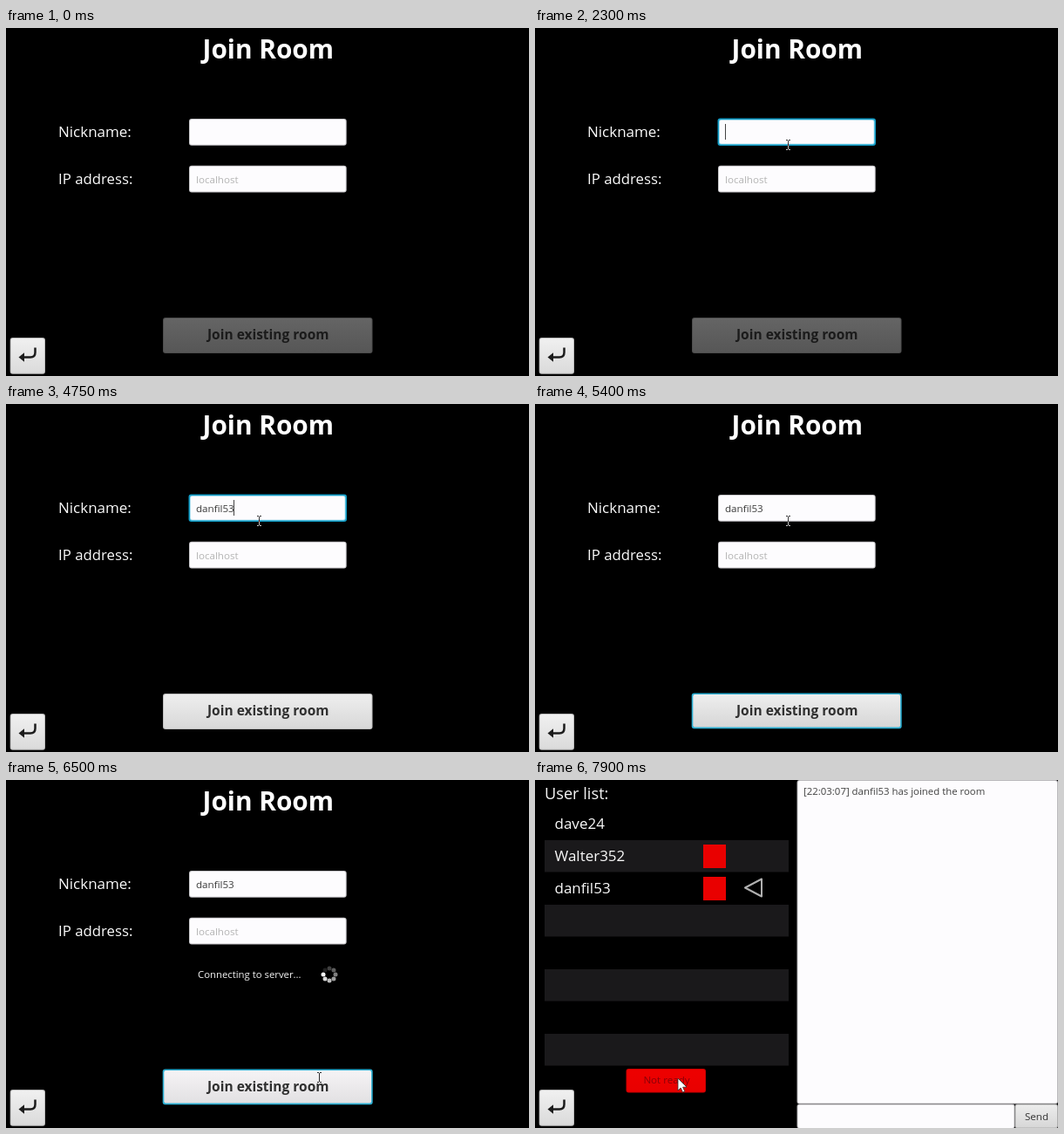
Animation, 600 px wide and 399 px high, one loop 8 s. Source, as an HTML page with a canvas:

```html
<!DOCTYPE html>
<html lang="en">
<head>
<meta charset="utf-8">
<title>Join Room</title>
<style>
  html, body { margin: 0; width: 100%; height: 100%; overflow: hidden; background: #000; }
  canvas { display: block; width: 600px; height: 399px; }
</style>
</head>
<body>
<canvas id="stage" width="600" height="399"></canvas>
<script>
const ctx = document.getElementById('stage').getContext('2d');
const LOOP = 8000, STEP = 50;
const FONT = '"Open Sans", "Noto Sans", sans-serif';
const NICK = 'danfil53';

const FOCUS_NICK = 1250, TYPE_START = 3350, TYPE_GAP = 125;
const FOCUS_IP = 4800, FOCUS_JOIN = 5350, HOVER = 6150;
const CONNECT = 6450, ROOM = 6550;

// Pointer keys: time, x, y
const TO_JOIN = [
  [5600, 290, 134], [5750, 298, 172], [5900, 318, 265],
  [6000, 331, 309], [6100, 339, 327], [6250, 352, 337], [6400, 359, 341]
];
const TO_READY = [
  [7000, 359, 341], [7150, 350, 305], [7300, 318, 258], [7450, 262, 250],
  [7600, 205, 287], [7750, 157, 340], [7850, 145, 345], [7900, 164, 342]
];

function spline(a, b, c, d, u) {
  return 0.5 * (2 * b + (c - a) * u + (2 * a - 5 * b + 4 * c - d) * u * u
    + (3 * b - a - 3 * c + d) * u * u * u);
}

function along(keys, t) {
  const last = keys.length - 1;
  if (t <= keys[0][0]) return keys[0].slice(1);
  if (t >= keys[last][0]) return keys[last].slice(1);
  let i = 0;
  while (t >= keys[i + 1][0]) i++;
  const at = k => keys[Math.max(0, Math.min(last, k))];
  const u = (t - keys[i][0]) / (keys[i + 1][0] - keys[i][0]);
  return [1, 2].map(n => spline(at(i - 1)[n], at(i)[n], at(i + 1)[n], at(i + 2)[n], u));
}

function text(str, x, y, size, color, weight = 400, align = 'left') {
  ctx.font = `${weight} ${size}px ${FONT}`;
  ctx.textAlign = align;
  ctx.fillStyle = color;
  ctx.fillText(str, x, y);
}

function rect(x, y, w, h, color) {
  ctx.fillStyle = color;
  ctx.fillRect(x, y, w, h);
}

function box(x, y, w, h, r, color) {
  ctx.beginPath();
  ctx.roundRect(x, y, w, h, r);
  ctx.fillStyle = color;
  ctx.fill();
}

function shade(y, h, top, bottom) {
  const g = ctx.createLinearGradient(0, y, 0, y + h);
  g.addColorStop(0, top);
  g.addColorStop(1, bottom);
  return g;
}

function button(x, y, w, h, top, bottom, edge, line = 1) {
  box(x, y, w, h, 3, edge);
  box(x + line, y + line, w - 2 * line, h - 2 * line, 2, shade(y, h, top, bottom));
}

function field(y, focused) {
  if (focused) {
    box(209.5, y - 0.5, 181.5, 31.5, 3, '#109cc6');
    box(211, y + 1, 178.5, 28.5, 2, '#8fd3e8');
    box(211.7, y + 1.7, 177, 27, 2, '#fdfcfe');
  } else {
    box(210, y, 180.7, 30.7, 3, '#c9c8cc');
    box(211, y + 1, 178.7, 28.7, 2, '#fdfcfe');
  }
}

function caret(x, y) {
  rect(x, y, 1, 18, '#444');
}

function backButton() {
  button(4.7, 355, 40.3, 41.7, '#f1f1f1', '#dadada', '#bcbcbc');
  ctx.strokeStyle = ctx.fillStyle = '#1c1c1c';
  ctx.lineWidth = 2.5;
  ctx.beginPath();
  ctx.moveTo(33.5, 366.5);
  ctx.lineTo(33.5, 372);
  ctx.quadraticCurveTo(33.5, 377.5, 28, 377.5);
  ctx.lineTo(19, 377.5);
  ctx.stroke();
  ctx.beginPath();
  ctx.moveTo(14.5, 377.5);
  ctx.lineTo(21, 372.3);
  ctx.lineTo(21, 382.7);
  ctx.fill();
}

function spinner(t) {
  const turn = Math.floor((t - 6500) / 100);
  for (let i = 0; i < 8; i++) {
    const a = Math.PI + (turn - i) * Math.PI / 4;
    const level = 250 - 31 * i;
    ctx.fillStyle = `rgb(${level},${level},${level})`;
    ctx.beginPath();
    ctx.arc(371 + 7 * Math.cos(a), 223 + 7 * Math.sin(a), 2.5, 0, 7);
    ctx.fill();
  }
}

function joinButton(t) {
  if (t < TYPE_START) {
    button(180, 332, 240.5, 41, '#656565', '#565656', '#4c4c4c');
  } else if (t < FOCUS_JOIN) {
    button(180, 332, 240.5, 41, '#efefef', '#d7d7d7', '#bdbdbd');
  } else {
    const hot = t >= HOVER;
    button(179.7, 331.5, 241, 40.7, hot ? '#f6f4f6' : '#efefef',
      hot ? '#e1e0e2' : '#d5d5d5', '#2aaed2', 1.6);
  }
  text('Join existing room', 300.7, 357.3, 15.5, t < TYPE_START ? '#1b1b1b' : '#303030', 700, 'center');
}

function joinScreen(t) {
  const inNick = t >= FOCUS_NICK && t < FOCUS_IP;
  const inIp = t >= FOCUS_IP && t < FOCUS_JOIN;
  const count = t < TYPE_START ? 0 : Math.floor((t - TYPE_START) / TYPE_GAP) + 1;
  const typed = NICK.slice(0, count);

  text('Join Room', 300.8, 35.3, 29.8, '#fff', 700, 'center');
  text('Nickname:', 60, 125.3, 17, '#fafafa');
  text('IP address:', 60, 179, 16.8, '#fafafa');

  field(104, inNick);
  text(typed, 218, 124, 11.6, '#3a3a3a');
  const blink = Math.floor((t - 1300) / 500) % 2 === 0;
  if (inNick && t >= 1300 && (count || blink)) {
    caret(Math.round(217.5 + ctx.measureText(typed).width), 110);
  }

  field(157.7, inIp);
  if (inIp) caret(218, 164);
  else text('localhost', 218, 178, 11.6, '#b4b4b4');

  if (t >= CONNECT) {
    text('Connecting to server...', 220, 227, 11.35, '#f4f4f4');
    spinner(t);
  }
  joinButton(t);
}

function roomScreen() {
  text('User list:', 11, 22, 18.2, '#f6f6f6');
  for (let i = 0; i < 4; i++) rect(11, 69 + i * 74, 280, 36.5, '#1a191b');
  ['dave24', 'Walter352', NICK].forEach((name, i) => {
    text(name, 22.5, 56 + i * 37.2, 17, '#fafafa');
    if (i) rect(193, 37 + i * 37, 26, 27, '#e90000');
  });

  ctx.strokeStyle = '#b0b0b0';
  ctx.lineWidth = 2;
  ctx.lineJoin = 'round';
  ctx.beginPath();
  ctx.moveTo(241, 123.5);
  ctx.lineTo(260, 113.5);
  ctx.lineTo(260, 133.5);
  ctx.closePath();
  ctx.stroke();

  button(104.5, 331, 91.5, 27.5, '#ee0000', '#e80000', '#c80000');
  text('Not ready', 151, 348, 11.6, '#8a0008', 400, 'center');

  box(300.5, 0, 299.5, 371.5, 3, '#b9b8bb');
  box(301.5, 1, 297.5, 369.5, 2, '#fdfcfe');
  text(`[22:03:07] ${NICK} has joined the room`, 308, 17, 11.4, '#404040');
  box(300.5, 371.5, 250, 28, 3, '#b9b8bb');
  box(301.5, 372.5, 248, 26.5, 2, '#fdfcfe');
  button(550.5, 371.5, 49.5, 28, '#ededed', '#d6d6d6', '#adadad');
  text('Send', 575.5, 390, 11.6, '#333', 400, 'center');
}

function beam(x, y) {
  ctx.save();
  ctx.globalCompositeOperation = 'difference';
  const c = '#c4c4c4';
  x = Math.round(x);
  y = Math.round(y);
  rect(x, y - 5, 1, 10, c);
  for (const dy of [-6, 5]) {
    rect(x - 2, y + dy, 2, 1, c);
    rect(x + 1, y + dy, 2, 1, c);
  }
  ctx.restore();
}

function arrow(x, y) {
  const shape = [[0, 0], [0, 14], [3.2, 11], [5.5, 16], [7.8, 15], [5.6, 10.2], [10, 10]];
  ctx.beginPath();
  shape.forEach(([dx, dy]) => ctx.lineTo(x + dx, y + dy));
  ctx.closePath();
  ctx.fillStyle = '#fff';
  ctx.fill();
  ctx.strokeStyle = '#333';
  ctx.lineWidth = 0.8;
  ctx.stroke();
}

function pointer(t) {
  if (t < FOCUS_NICK) return;
  const [x, y] = along(t < ROOM ? TO_JOIN : TO_READY, t);
  const overText = t < 6500
    ? y <= 135 || (y > 157 && y < 189)
    : x > 300;
  (overText ? beam : arrow)(x, y);
}

function draw(now) {
  const t = Math.floor((now % LOOP) / STEP) * STEP;
  rect(0, 0, 600, 399, '#000');
  if (t < ROOM) joinScreen(t);
  else roomScreen();
  backButton();
  pointer(t);
}

const start = performance.now();
function tick() {
  draw(performance.now() - start);
  requestAnimationFrame(tick);
}
tick();
</script>
</body>
</html>
```
